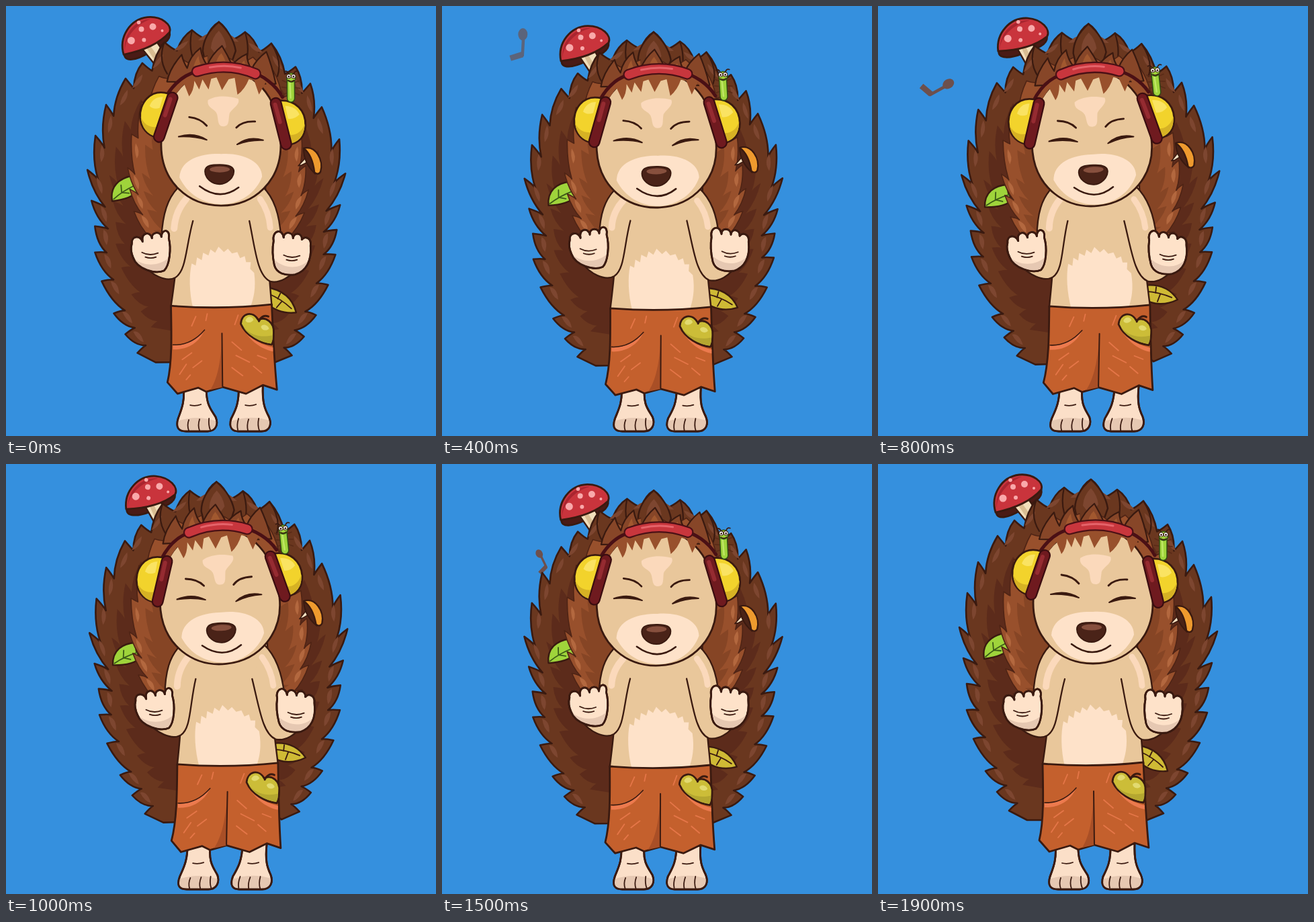
These frames come from a looping animation (640 px wide and 640 px high, 2 s). An HTML page:

```html
<!DOCTYPE html>
<html lang="en">
<head>
<meta charset="utf-8">
<title>Dancing hedgehog</title>
<style>
html, body { margin: 0; width: 100%; height: 100%; overflow: hidden; background: #3590de; }
svg { display: block; width: 100vw; height: 100vh; }
</style>
</head>
<body>
<svg id="stage" viewBox="0 0 640 640" stroke-linecap="round" stroke-linejoin="round"></svg>
<script>
const LOOP = 2000, STEP = 100;
const INK = '#3a1a10', SKIN = '#e9c79b', PALE = '#fee2c9', SHADE = '#e6c8b2';
const stage = document.getElementById('stage');

function add(tag, attrs, parent) {
  const node = document.createElementNS('http://www.w3.org/2000/svg', tag);
  for (const k in attrs) node.setAttribute(k, attrs[k]);
  return parent.appendChild(node);
}
const group = (parent = stage) => add('g', {}, parent);
const shape = (g, d, fill, stroke = 'none', width = 2.4) =>
  add('path', { d, fill, stroke, 'stroke-width': width }, g);
const line = (g, d, stroke = INK, width = 2.4) => shape(g, d, 'none', stroke, width);
const dot = (g, cx, cy, rx, fill, ry = rx) => add('ellipse', { cx, cy, rx, ry, fill }, g);

const notes = [group(), group()];
const toadstool = group();
const shell = group();
const greenLeaf = group();
const yellowLeaf = group();
const ruff = group();
const body = group();
const head = group();

// ---- spiky outlines ----
const CX = 313, CY = 290;
function unit(a, b) {
  const x = b[0] - a[0], y = b[1] - a[1], n = Math.hypot(x, y);
  return [x / n, y / n];
}
const shrink = (pts, k) => pts.map(([x, y]) => [CX + (x - CX) * k, CY + (y - CY) * k]);

function spikes(pts, depth, end) {
  let d = 'M' + pts[0];
  for (let i = 1; i < pts.length; i++) {
    const p = pts[i - 1], q = pts[i], n = unit(q, [CX, CY]);
    const k = Math.max(0.45 - (i - 1) * 0.14, -0.2);
    const v = [0, 1].map(j => q[j] + n[j] * depth + (p[j] - q[j]) * k);
    const c = [0, 1].map(j => p[j] * 0.42 + v[j] * 0.58 - n[j] * depth * 0.42);
    const e = [0, 1].map(j => v[j] * 0.55 + q[j] * 0.45 + n[j] * 3);
    d += ` Q${c} ${v} Q${e} ${q}`;
  }
  return d + ' L' + end;
}
function glints(g, pts, fill, gap, size) {
  for (let i = 0; i < pts.length - 1; i++) {
    const p = pts[i], n = unit(p, [CX, CY]), f = unit(p, pts[i + 1]);
    const at = (u, v) => [0, 1].map(j => p[j] + n[j] * u + f[j] * v);
    shape(g, `M${at(gap, 8)} Q${at(gap + 11, size * .5)} ${at(gap + 5, size)} Q${at(gap - 2, size * .7)} ${at(gap, 8)}Z`, fill);
  }
}

const backL = [[317,23],[277,35],[236,53],[203,84],[178,107],[149,146],[133,192],[121,243],
  [127,289],[132,327],[132,366],[142,409],[160,457],[177,488],[195,516]];
const backR = [[317,23],[356,38],[395,55],[431,90],[453,115],[470,150],[496,198],[505,249],
  [497,296],[492,333],[490,370],[479,415],[461,460],[443,492],[425,520]];
const backs = [[backL, '222,530 246,530 313,525'], [backR, '398,531 390,525 313,525']];
for (const [pts, end] of backs) {
  shape(shell, spikes(pts, 19, end), '#6a371f', INK, 2.6);
  glints(shell, pts, '#7d4630', 13, 32);
}
for (const [pts] of backs)
  shape(shell, spikes(shrink(pts, .83), 15, [CX, 495]), '#5c2b1b');
shape(shell, 'M293,66 Q294,42 317,23 Q338,42 342,66 L330,100 L300,100Z', '#6a371f', INK);
shape(shell, 'M305,62 Q306,46 317,36 Q326,46 328,60 L316,76Z', '#7d4630');
line(shell, 'M277,35 Q270,66 284,88 M356,38 Q364,66 356,86 M236,53 Q226,78 240,100 M395,55 Q412,82 404,104', INK, 2.2);

// ---- things stuck in the spikes ----
shape(toadstool, 'M176,71 C176,84 194,80 212,69 C232,58 246,50 243,38Z', '#4a1b15', INK, 2.8);
shape(toadstool, 'M203,64 Q211,53 225,54 L246,84 L226,92Z', '#f2dfbb', INK);
shape(toadstool, 'M209,62 L214,58 L236,88 L228,90Z', '#d9bd92');
shape(toadstool, 'M175,72 C167,46 184,19 210,16 C231,14 247,27 243,38 Q222,62 175,72Z', '#c9343c', INK, 2.8);
shape(toadstool, 'M177,69 C175,50 190,28 214,19 C196,19 172,38 177,69Z', '#a9252f');
for (const [x, y, r] of [[186,51,5.5],[201,34,4],[218,30,5],[197,24,2.8],[232,36,2],[205,50,3]])
  dot(toadstool, x, y, r, '#f9a9aa');

shape(greenLeaf, 'M158,290 C154,268 168,256 187,252 C187,262 190,268 198,273 C190,283 175,288 158,290Z', '#9fd43b', INK);
line(greenLeaf, 'M160,287 Q173,275 192,266 M172,277 L171,266 M172,277 L183,278', '#3c5a17', 1.8);

shape(yellowLeaf, 'M385,418 C408,422 426,434 431,457 C412,459 394,452 385,438Z', '#cfba35', INK);
line(yellowLeaf, 'M390,428 Q410,437 424,451 M404,436 L408,428 M410,440 L402,449', INK, 1.8);

// ---- ruff ----
const ruffL = [[300,74],[262,78],[228,104],[202,142],[187,190],[181,240],[184,272],[190,305],[201,342],[226,364]];
const ruffR = [[322,74],[368,76],[398,96],[422,132],[440,196],[446,238],[450,274],[444,308],[432,344],[408,364]];
for (const pts of [ruffL, ruffR]) {
  shape(ruff, spikes(pts, 12, [CX, 370]), '#98502c', '#4f2415', 1.6);
  shape(ruff, spikes(shrink(pts, .84), 14, [CX, 350]), '#864525');
  glints(ruff, pts.slice(3), '#b3683f', 9, 28);
}
shape(ruff, 'M240,112 Q244,92 262,72 Q264,82 270,92 Q274,74 290,62 Q292,78 300,88 Q306,72 322,59 Q331,74 337,88 Q344,78 359,71 Q359,84 366,94 Q372,80 388,68 Q396,88 402,116Z',
  '#874628', INK, 2.2);
shape(ruff, 'M311,92 Q314,76 321,70 Q328,80 329,92Z M279,92 Q282,80 287,74 Q288,84 293,92Z M348,94 Q350,84 355,81 Q357,90 360,96Z', '#a1582f');
shape(ruff, 'M435,238 L447,225 L452,231 L440,237Z', '#f7e3c4', INK, 1.6);
shape(ruff, 'M443,213 C443,228 449,240 460,250 C458,230 452,218 443,213Z', '#4a2317', INK, 2);
shape(ruff, 'M443,212 C461,207 473,230 468,247 C466,251 462,251 459,248 C457,230 452,219 443,212Z', '#ee9a2e', INK);

// ---- body, drawn from paths that bend with the dance ----
const bent = [];
const bend = (d, fill, stroke, width, how = 'trunk') =>
  bent.push({ d, how, node: shape(body, d, fill, stroke, width) });
const bendLine = (d, stroke = INK, width = 2, how) => bend(d, 'none', stroke, width, how);

for (const [leg, sole, marks] of [
  ['M264,565 C266,590 261,600 256,614 C252,628 257,633 268,633 L300,633 C313,633 316,622 312,612 C305,600 297,594 298,565Z',
   'M255,618 Q284,608 313,618 C315,628 310,632 300,632 L268,632 C258,632 254,628 255,618Z',
   'M272,616 Q269,624 272,632 M288,615 Q285,624 288,632 M302,614 Q301,624 304,631 M274,594 Q282,596 290,593'],
  ['M346,565 C347,592 341,602 335,614 C331,628 337,633 346,633 L380,633 C393,633 396,622 391,611 C385,600 381,590 382,565Z',
   'M335,618 Q364,608 392,617 C395,628 390,632 380,632 L346,632 C337,632 333,627 335,618Z',
   'M346,614 Q343,624 345,631 M361,615 Q358,624 360,632 M376,614 Q374,624 377,632 M356,594 Q364,596 372,593']]) {
  bend(leg, '#fbdfc8', INK, 2.8);
  bend(sole, SHADE);
  bendLine(leg, INK, 2.8);
  bendLine(marks, INK, 1.8);
}
bend('M254,266 C262,330 252,400 245,447 Q320,453 395,446 C392,410 385,330 386,266Z', SKIN, INK, 2.4);
bend('M278,450 C272,425 272,400 276,383 L282,386 L284,374 L291,378 L293,367 L301,371 L304,362 L311,367 L316,358 L324,366 L330,361 L336,368 L344,366 L348,375 L355,372 L357,381 L364,381 L363,391 L369,397 C372,420 368,435 363,449Z', PALE);

bend('M245,446 Q320,452 395,444 C397,490 399,530 403,571 L382,564 L357,577 L322,567 L298,574 L286,568 L255,577 L240,560 C247,530 246,490 245,446Z', '#c4602d', INK, 2.8);
bend('M321,488 C320,530 314,555 304,571 L322,567Z', '#a94f26');
bend('M248,505 C268,506 284,495 295,482 C288,500 270,512 248,511Z M357,487 C368,502 382,511 397,514 L397,508 C382,505 368,497 357,487Z', '#ec7a4e');
bendLine('M248,504 C268,505 284,495 295,482', INK, 1.6);
bendLine('M321,487 L322,566', INK, 2);
bendLine('M282,462 L276,476 M299,458 L297,468 M262,526 L276,516 M258,548 L268,533 M278,538 L291,528 M268,556 L274,549 M336,500 L350,512 M342,520 L362,530 M336,538 L352,550 M368,536 L380,546 M345,460 L340,474 M374,520 L387,525', '#e57648', 1.8);

bend('M349,473 C350,456 367,453 375,467 C386,461 399,471 398,486 C398,495 397,500 395,504 C378,502 357,491 349,473Z', '#ccbd38', INK, 2.8);
bend('M353,478 C366,492 382,493 396,490 C397,495 396,499 394,502 C378,500 360,490 353,478Z', '#b5a730');
bend('M356,468 C358,461 366,461 368,467 C364,472 358,472 356,468Z M379,477 C382,472 390,475 391,480 C388,484 380,483 379,477Z', '#e2da70');
bendLine('M376,469 C378,463 384,459 390,462', INK, 3);

for (const d of [
  'M258,268 C240,285 233,310 231,345 L205,385 C215,400 238,412 252,404 C268,394 267,360 278,320',
  'M381,268 C399,285 407,310 409,345 L435,385 C425,405 405,413 393,410 C374,402 371,365 362,320'])
  bend(d, SKIN, INK, 2.3, 'arm');
bendLine('M268,287 C257,300 251,315 250,331', '#fbd9bb', 10, 'arm');
bendLine('M378,287 C387,300 392,314 393,330', '#fbd9bb', 9, 'arm');

for (const [palm, low, marks] of [
  ['M187,354 C186,342 200,341 203,351 C200,337 215,335 217,346 C216,336 230,335 231,344 C231,331 245,332 242,346 C246,362 243,386 235,394 C222,400 195,392 189,375 C186,368 185,360 187,354Z',
   'M190,376 C205,388 225,388 241,376 C240,385 238,390 234,393 C222,398 198,392 190,376Z',
   'M202,367 Q213,373 226,368 M207,374 Q215,377 223,374'],
  ['M398,350 C395,335 411,330 413,345 C413,335 427,336 427,346 C428,336 441,338 440,348 C444,342 455,345 453,357 C455,380 446,395 430,400 C415,402 402,398 399,386 C396,372 396,360 398,350Z',
   'M399,378 C415,392 435,392 449,380 C446,390 440,396 430,399 C415,401 402,397 399,378Z',
   'M413,371 Q424,377 437,372 M417,378 Q425,381 433,378']]) {
  bend(palm, PALE, INK, 2.8, 'hand');
  bend(low, SHADE, 'none', 0, 'hand');
  bendLine(palm, INK, 2.8, 'hand');
  bendLine(marks, INK, 1.8, 'hand');
}

// ---- head ----
const face = 'M231,207 C231,145 262,96 320,96 C380,96 409,145 409,207 C409,260 370,297 320,297 C270,297 231,260 231,207Z';
shape(head, face, SKIN);
const snout = group(head);
shape(snout, 'M258,255 C260,225 296,219 320,220 C350,218 381,230 381,254 C372,278 348,295 320,295 C293,294 270,280 258,255Z', PALE);
line(head, face, INK, 2.8);
shape(head, 'M301,140 C312,133 330,133 346,138 C350,147 336,153 333,160 C331,170 333,179 324,179 C314,179 317,168 314,160 C311,152 299,152 301,140Z', '#fbd9bb');
shape(head, 'M240,130 Q262,100 300,93 Q350,86 380,100 Q402,114 404,134 L396,142 Q392,126 387,114 L377,132 L370,111 L362,109 Q356,124 345,132 L341,107 L332,109 L322,125 L314,106 L306,108 L302,124 L293,109 L288,124 L281,111 Q280,126 273,134 L266,116 Q254,128 246,142Z', '#98502c');
line(head, 'M273,165 Q290,167 299,178 M343,181 Q352,171 371,172', INK, 2.8);
shape(head, 'M257,194 Q280,187 299,199 Q280,193 257,194Z M344,206 Q361,193 383,200 Q363,199 344,206Z', INK, INK, 2);
shape(snout, 'M296,246 C296,236 308,236 318,236 C330,236 339,238 339,246 C339,256 328,265 318,265 C306,265 296,256 296,246Z', '#4a2318', INK, 2);
dot(snout, 318, 243, 15, '#87503e', 4.5);
line(snout, 'M288,268 Q318,291 346,270', INK, 2.6);

line(head, 'M240,132 C258,104 278,97 300,94 M360,96 C384,103 402,118 412,136', '#4a1015', 5);
const band = 'M285,97 Q330,83 372,101';
line(head, band, '#4a1015', 17);
line(head, band, '#c8363d', 12.5);
line(head, 'M304,91 Q328,87 350,92', '#e5636a', 3);
for (const [cup, shade, shine, pad, gleam] of [
  ['M243,130 C215,121 198,145 200,166 C201,180 210,192 225,195Z', 'M201,164 C206,178 218,182 231,178 L225,194 C210,191 202,180 201,164Z',
   'M214,148 C218,138 226,134 234,135 L229,151 Q220,154 214,148Z', 'M248,136 L228,194', 'M245,138 L237,162'],
  ['M408,141 C431,140 447,156 446,179 C445,195 436,205 420,207Z', 'M445,176 C440,190 428,195 416,191 L420,206 C435,204 444,194 445,176Z',
   'M416,149 C426,149 434,154 437,162 Q429,170 420,168Z', 'M402,145 L417,206', 'M401,147 L408,173']]) {
  shape(head, cup, '#f2d32c', INK, 2.8);
  shape(head, shade, '#d6b224');
  shape(head, shine, '#fae362');
  line(head, pad, '#3b0d10', 18);
  line(head, pad, '#6f1a1f', 13.5);
  line(head, gleam, '#952b31', 6);
}

const bug = group(head);
line(bug, 'M418,114 L412,111 M418,122 L411,121 M418,130 L412,132 M431,114 L437,112 M431,122 L438,123 M431,130 L437,133', '#5a2b18', 1.6);
line(bug, 'M421,101 Q419,96 415,98 M429,101 Q431,96 435,98', INK, 1.8);
line(bug, 'M424.5,108 L424.5,138', '#2f4d14', 12.5);
line(bug, 'M424.5,108 L424.5,138', '#9fd43b', 9.5);
line(bug, 'M423,114 L424,137', '#bfe765', 2.5);
dot(bug, 425, 107, 7.4, '#2f4d14');
dot(bug, 425, 107, 6, '#9fd43b');
for (const x of [421.5, 428.5]) {
  dot(bug, x, 105, 3.6, INK);
  dot(bug, x, 105, 2.7, '#fff');
  dot(bug, x, 105.4, 1.4, INK);
}
line(bug, 'M421,111 Q425,114 429,111', INK, 1.4);

// ---- music notes ----
for (const g of notes) {
  dot(g, -18, -6, 9, '#75483a', 7);
  const stem = (d, width) => add('path', { d, fill: 'none', stroke: '#75483a', 'stroke-width': width,
    'stroke-linecap': 'butt', 'stroke-linejoin': 'miter' }, g);
  stem('M-14,-7 L13,-6 L15,0', 4.5);
  stem('M12,-6 L18,12', 8.5);
}

// ---- motion ----
const swayKeys = [[0,.05],[200,.25],[600,.83],[900,1.02],[1200,.84],[1500,.47],[1900,0]];
const bobKeys = [[0,.05],[200,.54],[440,1],[600,.85],[800,.22],[900,.02],[1200,.72],[1430,1.01],[1500,1],[1680,.6],[1900,0]];

// Smooth curve through the keys, wrapping round the loop.
function curve(keys, t) {
  const n = keys.length;
  const key = i => {
    const w = Math.floor(i / n), [x, y] = keys[i - w * n];
    return [x + w * LOOP, y];
  };
  let i = n - 1;
  while (keys[i][0] > t) i--;
  const a = key(i), b = key(i + 1), h = b[0] - a[0], u = (t - a[0]) / h;
  const slope = j => {
    const p = key(j - 1), q = key(j + 1);
    return (q[1] - p[1]) / (q[0] - p[0]);
  };
  const v = 1 - u;
  return v * v * (1 + 2 * u) * a[1] + u * u * (3 - 2 * u) * b[1] + h * u * v * (v * slope(i) - u * slope(i + 1));
}

// Straight-line interpolation between [y, value] stops.
function ramp(stops, y) {
  if (y <= stops[0][0]) return stops[0][1];
  for (let i = 1; i < stops.length; i++) {
    const [y0, v0] = stops[i - 1], [y1, v1] = stops[i];
    if (y <= y1) return v0 + (v1 - v0) * (y - y0) / (y1 - y0);
  }
  return stops[stops.length - 1][1];
}
const sideways = [[290,3],[445,10],[570,6],[635,1]];
const drop = {
  trunk: [[290,3],[445,4],[570,3],[600,0]],
  arm: [[285,3],[345,-3],[410,-2]],
  hand: [[0,-6]]
};

function placeNote(g, x, y, turn, size, alpha) {
  g.setAttribute('opacity', alpha);
  g.setAttribute('transform', `translate(${x} ${y}) rotate(${turn}) scale(${size})`);
}

function draw(t) {
  const s = curve(swayKeys, t), b = curve(bobKeys, t);
  const move = (g, v) => g.setAttribute('transform', v);

  move(shell, `translate(${4 * s} ${530 + 4 * b}) scale(1 ${1 - .0246 * b}) translate(0 -530) rotate(${-1.8 * s} 315 270)`);
  move(toadstool, `translate(${8 * s} ${15 * b - 2 * s}) rotate(${10 * s} 208 45)`);
  move(greenLeaf, `translate(${s} ${9 * s + 2 * b}) rotate(${8 * s} 158 290)`);
  move(yellowLeaf, `translate(${6 * s} ${3 * b - 5 * s}) rotate(${-21 * s} 393 425)`);
  move(ruff, `translate(${3 * s} ${270 + 3 * b}) scale(1 ${1 - .015 * b}) translate(0 -270) rotate(${-4 * s} 315 250)`);
  move(head, `translate(${3 * s} ${3 * b}) rotate(${-6 * s} 320 250)`);
  move(snout, `rotate(${3 * s} 320 250)`);

  for (const { node, d, how } of bent) {
    node.setAttribute('d', d.replace(/([\d.]+),([\d.]+)/g, (_, x, y) =>
      (+x + s * ramp(sideways, +y)).toFixed(2) + ',' + (+y + b * ramp(drop[how], +y)).toFixed(2)));
  }

  // Each note floats out twice per loop, 900 ms apart.
  const age = start => (t >= start + 900 ? t - start - 900 : t - start) / 100;
  const u = age(200), w = age(600);
  placeNote(notes[0], 146 - 16 * u, 124 - 32 * u, -17 + 54 * u, Math.min(1, .92 + .08 * u),
    u >= 0 && u < 3 ? Math.min(1, 1.6 - .5 * u) : 0);
  placeNote(notes[1], 147 - 35 * w + 2.3 * w * w, 147 - 13.5 * w, 62 + 43.5 * w, Math.min(1, .72 + .14 * w),
    w >= 0 && w < 4 ? Math.min(.88, 1.7 - .4 * w) : 0);
}

function tick() {
  draw(Math.floor(performance.now() / STEP) * STEP % LOOP);
  requestAnimationFrame(tick);
}
tick();
</script>
</body>
</html>
```
